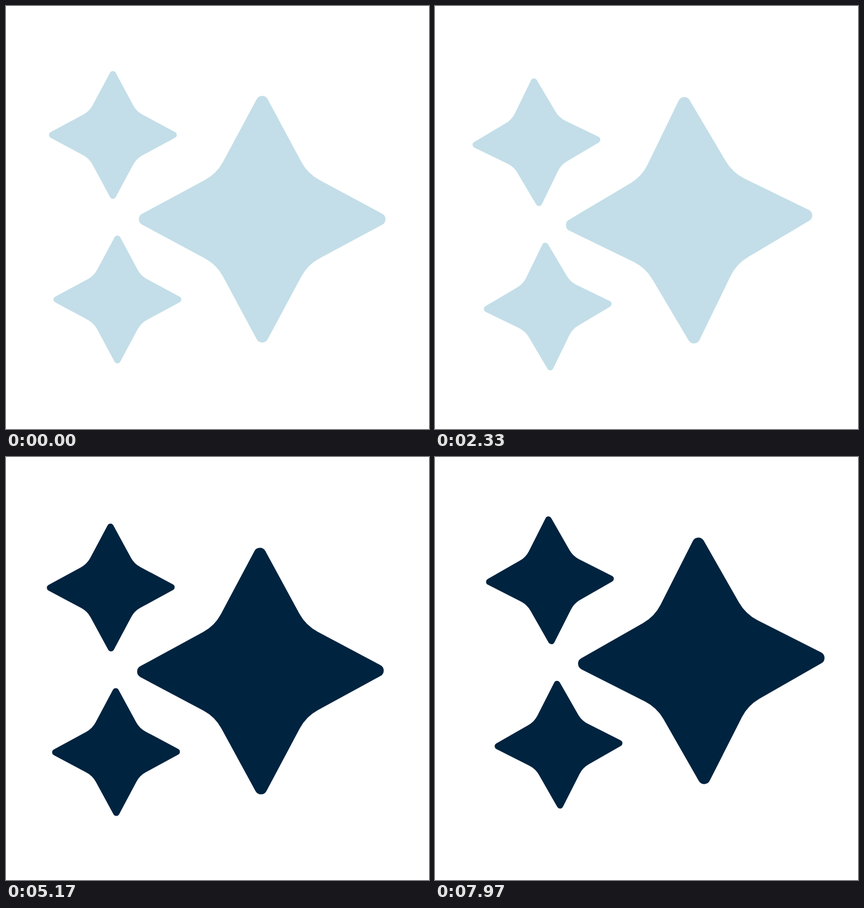
Recreate the animation shown at these times as an HTML page. Size 748x748 px, loop 8000 ms.

```html
<!DOCTYPE html>
<html lang="en">
<head>
<meta charset="utf-8">
<title>Sparkles</title>
<style>
  html, body { margin: 0; width: 100%; height: 100%; overflow: hidden; background: #fff; }
  svg { display: block; width: 100%; height: 100%; }
</style>
</head>
<body>
<svg viewBox="0 0 748 748">
  <defs><path id="star"/></defs>
  <g id="group">
    <use href="#star" transform="translate(79 3)"/>
    <use href="#star" transform="translate(-185 -146) scale(.5183)"/>
    <use href="#star" transform="translate(-177 145) scale(.5183)"/>
  </g>
</svg>
<script>
const LOOP = 8000, FPS = 30, CENTER = 374;
const LIGHT = '#c3dee8', DARK = '#00233f';

// The group eases to a new pose [x, y, degrees] twice a second
const STEP = 0.5;
const POSES = [
  [0, 0, 0], [-12, 7.5, -1], [8, 3, -.5], [-7.7, -4, 5], [-4.4, -8.7, .6],
  [-3.5, 10, -3.4], [18.1, -14.9, -1.4], [-21, -17, 6], [-15.1, -1.3, 2.8], [-16, 3, -1.5]
];
const CYCLE = STEP * POSES.length;

// Four-pointed star: one arm repeated at quarter turns
function starPath() {
  const turn = ([x, y], n) => n ? turn([-y, x], n - 1) : [x, y];
  let d = '';
  for (let n = 0; n < 4; n++) {
    const p = (x, y) => turn([x, y], n).join(' ');
    d += `${n ? 'L' : 'M'}${p(-9.7, -212.2)}A11 11 0 0 1 ${p(9.7, -212.2)}` +
         `L${p(69.5, -101)}Q${p(80.6, -80.6)} ${p(101, -69.5)}`;
  }
  return d + 'Z';
}

function poseAt(sec) {
  const beat = sec / STEP, i = Math.floor(beat), s = beat - i;
  const from = POSES[i % POSES.length], to = POSES[(i + 1) % POSES.length];
  const ease = s * s * (3 - 2 * s);
  return from.map((v, k) => v + (to[k] - v) * ease);
}

const group = document.getElementById('group');
document.getElementById('star').setAttribute('d', starPath());

function draw(ms) {
  // Snap to whole frames; times are rounded to 10 ms
  const sec = Math.floor((ms % LOOP + 5) * FPS / 1000) / FPS % (LOOP / 1000);
  const [x, y, angle] = poseAt(sec);
  group.setAttribute('transform', `translate(${CENTER + x} ${CENTER + y}) rotate(${angle})`);
  group.setAttribute('fill', sec < CYCLE ? LIGHT : DARK);
}

let start;
function loop(now) {
  start ??= now;
  draw(now - start);
  requestAnimationFrame(loop);
}
draw(0);
requestAnimationFrame(loop);
</script>
</body>
</html>
```
